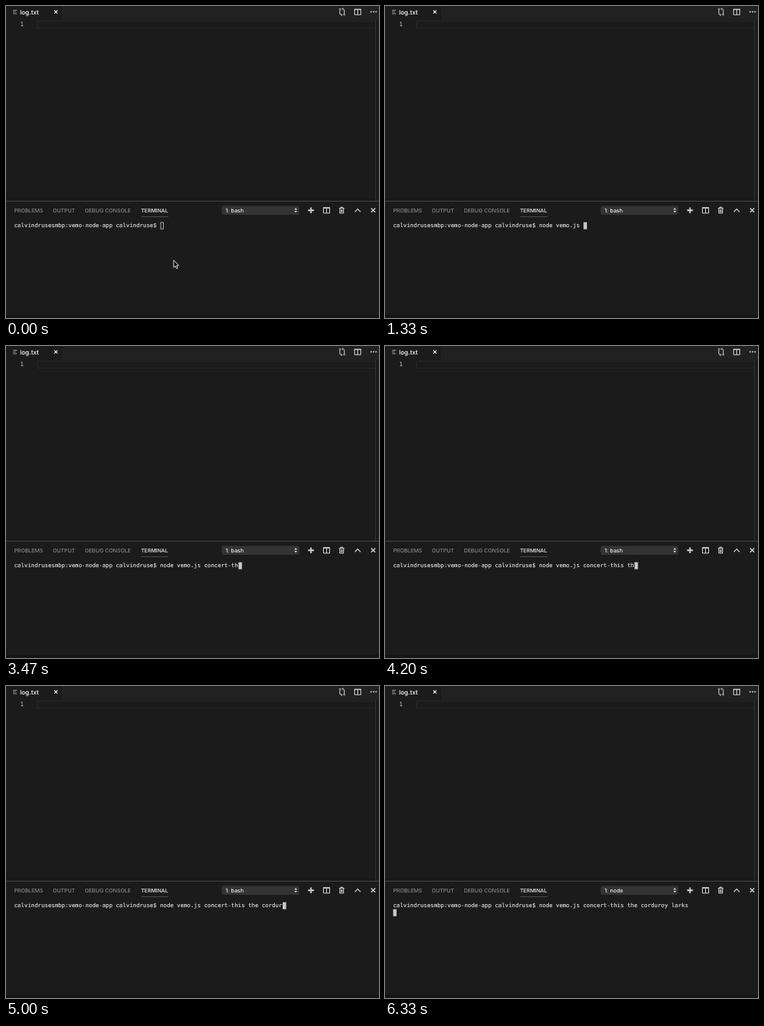
An HTML page for the animation above (8000 ms loop, 480x402 px).

```html
<!DOCTYPE html>
<html lang="en">
<head>
<meta charset="utf-8">
<title>Terminal session</title>
<style>
  html, body { margin: 0; width: 100%; height: 100%; overflow: hidden; background: #1b1b1b; }
  svg { display: block; width: 480px; height: 402px; }
  text { font-family: Inter, "Open Sans", sans-serif; text-rendering: geometricPrecision; white-space: pre; }
  .mono { font-family: "DejaVu Sans Mono", "Liberation Mono", monospace; }
  .tabs { font-size: 6.9px; fill: #9a9a9a; }
  .icon { fill: none; stroke: #d0d0d0; }
</style>
</head>
<body>
<svg viewBox="0 0 480 402">
  <rect width="480" height="402" fill="#1b1b1b"/>

  <!-- editor tab bar -->
  <rect x="72" width="408" height="18" fill="#212122"/>
  <path d="M9 5.5h5.2M9 7.7h3.8M9 9.9h5.2" stroke="#a8a8a8" stroke-width=".9"/>
  <text x="18" y="10.6" font-size="8" font-weight="500" fill="#fff">log.txt</text>
  <path class="icon" d="M62.2 5.6l4 4m0-4l-4 4" style="stroke:#f0f0f0" stroke-width="1.2"/>
  <g class="icon" stroke-width="1">
    <path d="M429.7 5.2v4.6q0 1.6 1.6 1.6h.8M435.3 10v-4.6q0-1.6-1.6-1.6h-.8"/>
    <path d="M433.6 2.4l-1.5 1.4 1.5 1.4M431.4 10l1.5 1.4-1.5 1.4" stroke-width=".8"/>
    <circle cx="429.7" cy="4.2" r=".9" stroke-width=".8"/>
    <circle cx="435.3" cy="11" r=".9" stroke-width=".8"/>
    <path d="M448.6 4.5h8v6.7h-8zM452.6 4.5v6.7"/>
    <path d="M448.1 4.4h9" stroke-width="1.5"/>
  </g>
  <g fill="#d0d0d0">
    <circle cx="469.8" cy="7.6" r="1"/><circle cx="473" cy="7.6" r="1"/><circle cx="476.2" cy="7.6" r="1"/>
  </g>

  <!-- editor body -->
  <text class="mono" x="18.3" y="26.4" font-size="7.6" fill="#c4c4c4">1</text>
  <path d="M475 19.5H40.5v9H475" fill="none" stroke="#272727"/>
  <path d="M475.5 18v233" stroke="#303030"/>

  <!-- panel header -->
  <path d="M0 251.5h480" stroke="#434343"/>
  <g class="tabs">
    <text x="10.4" y="265.6">PROBLEMS</text>
    <text x="60.2" y="265.6">OUTPUT</text>
    <text x="101.7" y="265.6">DEBUG CONSOLE</text>
    <text x="173.7" y="265.6" fill="#f0f0f0" font-weight="500" style="font-size:6.8px">TERMINAL</text>
  </g>
  <path d="M174 271.5h35" stroke="#555" stroke-width=".8"/>
  <rect x="277.5" y="257.5" width="100" height="11.4" rx="2.4" fill="#343434"/>
  <text id="shell" x="282.6" y="265.7" font-size="7" font-weight="500" fill="#f0f0f0">1: bash</text>
  <path d="M371.2 262.4l1.7-2.3 1.7 2.3zM371.2 264l1.7 2.3 1.7-2.3z" fill="#e4e4e4"/>
  <g class="icon" stroke-width="1">
    <path d="M388.7 263.2h7.6M392.5 259.4v7.6" stroke-width="1.9"/>
    <path d="M408.5 260.2h8v6.7h-8zM412.5 260.2v6.7"/>
    <path d="M408 260h9" stroke-width="1.5"/>
    <path d="M428.6 260.5h6.8M430.8 260.2v-1.1h2.4v1.1M429.6 261v6h4.8v-6M431.2 262v4M432.8 262v4"/>
    <path d="M448.9 265.4l3.7-3.8 3.7 3.8" stroke-width="1.2"/>
    <path d="M469.8 260.4l5.4 5.4m0-5.4l-5.4 5.4" stroke-width="1.4"/>
  </g>

  <!-- terminal -->
  <rect id="block"/>
  <text id="line" class="mono" x="10.5" y="285.4" font-size="7.267" fill="#e2e2e2" stroke="#e2e2e2" stroke-width=".12"></text>
  <path id="pointer" d="M215.8 327.6v9.3l2.1-2 1.5 3.5 1.6-.7-1.5-3.4h2.9z" fill="#0a0a0a" stroke="#ededed" stroke-width=".9" stroke-linejoin="round"/>

  <rect y="398" width="480" height="4" fill="#151416"/>
</svg>
<script>
  const LOOP = 8000, LEFT = 10.5, CELL = 4.375, TOP = 278.6, ROW = 9;
  const FOCUS = 70, HIDE = 600, ENTER = 6330;
  const prompt = "calvindrusesmbp:vemo-node-app calvindruse$ ";
  const command = "node vemo.js concert-this the corduroy larks";

  // [time, characters typed so far]
  const keys = [
    [0, 0], [670, 1], [730, 2], [800, 3], [930, 4],
    [1070, 5], [1130, 6], [1200, 7], [1330, 13],
    [2000, 14], [2070, 15], [2200, 17], [2270, 18], [2400, 19],
    [2930, 20], [3130, 21], [3330, 22], [3470, 23], [3530, 24], [3600, 25], [3800, 26],
    [4070, 27], [4200, 28], [4270, 29], [4330, 30], [4470, 31], [4600, 32], [4670, 33],
    [4870, 34], [4930, 35], [5000, 36], [5070, 37], [5130, 38],
    [5270, 39], [5400, 40], [5470, 41], [5600, 42], [5670, 43], [5870, 44]
  ];

  const [block, line, shell, pointer] =
    ["block", "line", "shell", "pointer"].map(id => document.getElementById(id));

  function set(el, attrs) {
    for (const name in attrs) el.setAttribute(name, attrs[name]);
  }

  function write(el, text) {
    if (el.textContent !== text) el.textContent = text;
  }

  function draw(t) {
    const typed = keys.filter(k => k[0] <= t).pop()[1];
    const entered = t >= ENTER;
    const focused = t >= FOCUS;
    const inset = focused ? 0 : 0.4;
    const column = entered ? 0 : prompt.length + typed;

    write(line, prompt + command.slice(0, typed));
    write(shell, entered ? "1: node" : "1: bash");
    set(pointer, { visibility: t < HIDE ? "visible" : "hidden" });
    set(block, {
      x: LEFT + column * CELL + inset,
      y: TOP + (entered ? ROW : 0) + inset,
      width: CELL - 2 * inset,
      height: ROW - 2 * inset,
      fill: focused ? "#cacaca" : "none",
      stroke: focused ? "none" : "#cacaca",
      "stroke-width": 0.8
    });
  }

  const start = performance.now();
  function tick() {
    draw((performance.now() - start) % LOOP);
    requestAnimationFrame(tick);
  }
  draw(0);
  requestAnimationFrame(tick);
</script>
</body>
</html>
```
